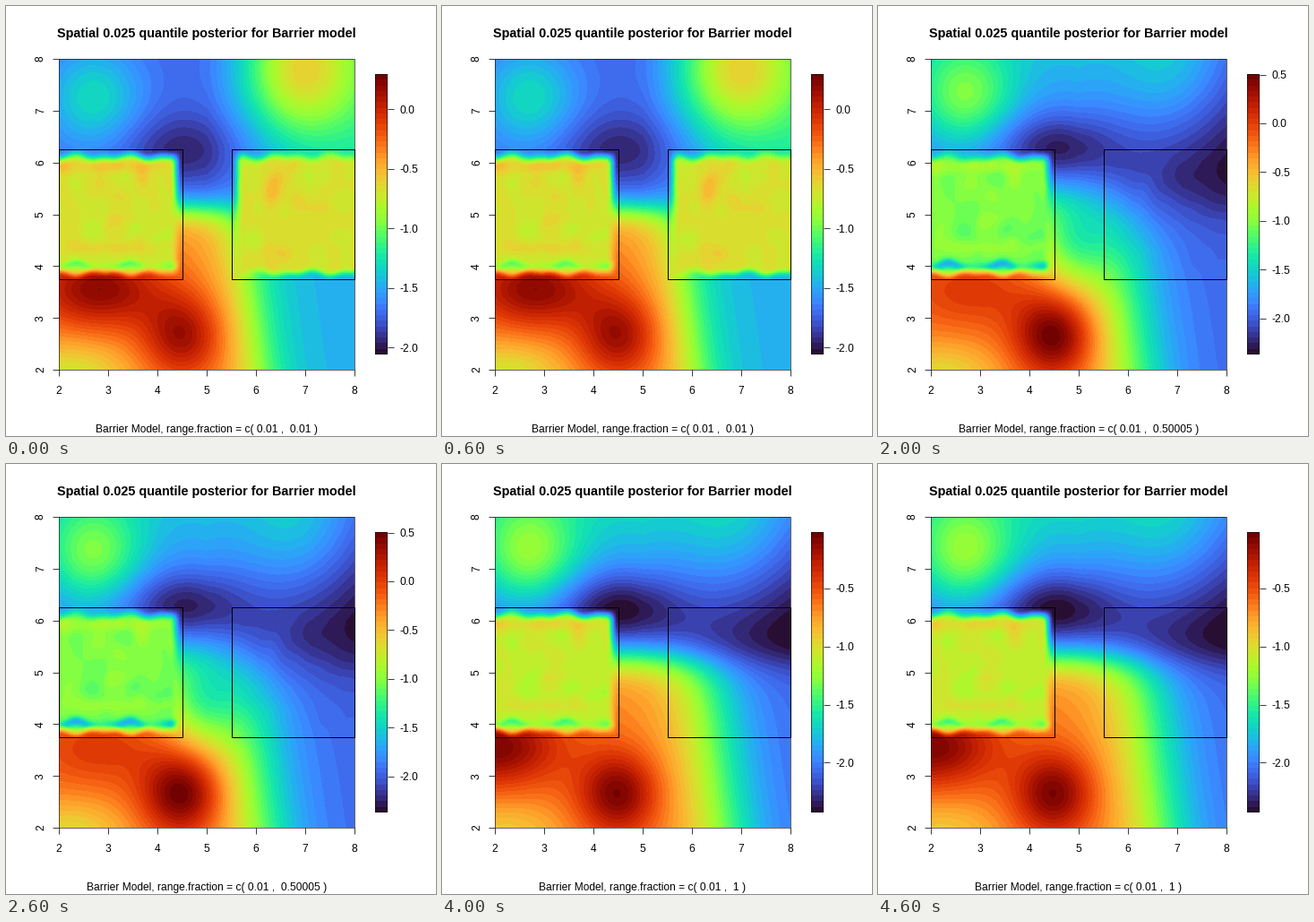
Recreate the animation shown at these times as a matplotlib script. Size 480 px wide and 480 px high, loop 5 s.

```python
import numpy as np
import matplotlib as mpl
import matplotlib.pyplot as plt
from matplotlib.animation import FuncAnimation
from matplotlib.patches import Rectangle

mpl.rcParams["font.family"] = "Liberation Sans"

DPI = 100
PX = 72 / DPI
LEFT, RIGHT, TOP, BOTTOM = 59, 389, 59, 406
BAR = (412, 426, 76, 389)
LEVELS = 50
COLORS = mpl.colormaps["turbo"](np.linspace(0, 1, LEVELS))[:, :3] ** 1.1

X, Y = np.meshgrid(np.linspace(2, 8, RIGHT - LEFT),
                   np.linspace(8, 2, BOTTOM - TOP))


def hill(x, y, rx, ry):
    return np.exp(-((X - x) / rx) ** 2 - ((Y - y) / ry) ** 2)


def sigmoid(t):
    return 1 / (1 + np.exp(-t))


def ramp(d, width):
    t = np.clip(d / width, 0, 1)
    return t * t * (3 - 2 * t)


def mottle(seed, x0, x1, count=60):
    """Random soft spots inside a barrier."""
    rng = np.random.default_rng(seed)
    return sum(rng.uniform(-1, 1)
               * hill(rng.uniform(x0, x1), rng.uniform(3.9, 6.1),
                      *rng.uniform(0.1, 0.28, 2))
               for _ in range(count))


WAVE = 0.03 * np.sin(6 * X) + 0.02 * np.sin(11 * X + 1)
INSIDE_Y = ramp(6.25 - Y + WAVE, 0.28) * ramp(Y - 3.75 + WAVE, 0.24)
LEFT_MASK = INSIDE_Y * ramp(4.5 - X, 0.26)
RIGHT_MASK = INSIDE_Y * ramp(X - 5.5, 0.26)
LEFT_NOISE = mottle(4, 2, 4.4)
RIGHT_NOISE = mottle(9, 5.6, 8)

# Warm and cold strips along the inner edges of the left barrier
GLOW = hill(3, 5.93, 1.2, 0.12) + 0.6 * hill(3, 4.35, 0.8, 0.12)
DIP = (0.65 + 0.35 * np.sin(6 * X)) * np.exp(-((Y - 4 - WAVE) / 0.09) ** 2)


def north(base, west, east, hole, lift, slope):
    return (base + lift * (Y - 7) + slope * np.maximum(X - 5, 0)
            + west * hill(2.7, 7.25, 1, 1) + east * hill(6.9, 7.8, 1.2, 1.3)
            - hole * hill(4.5, 6.25, 1.2, 0.7))


def south(cold, warm, edge, soft, hot, core, corner, pocket=0, hot_x=2.8):
    front = edge + 0.15 * (3.7 - Y)
    return (cold + warm * sigmoid((front - X) / soft)
            + hot * hill(hot_x, 3.55, 1.3, 0.75)
            + core * hill(4.5, 2.65, 0.8, 0.8)
            - corner * hill(2.2, 1.8, 1.2, 0.7)
            - pocket * hill(4.9, 4.5, 0.8, 0.9))


def scene(fraction, lo, hi, top, bottom, middle, blend,
          base, dip, right=None, grain=0):
    field = top + (bottom - top) * sigmoid((middle - Y) / blend)
    block = base + 0.035 * LEFT_NOISE + 0.06 * GLOW - dip * DIP
    if right is not None:
        field += (right + 0.03 * RIGHT_NOISE - field) * RIGHT_MASK
    field += grain * RIGHT_NOISE * RIGHT_MASK
    field += (block - field) * LEFT_MASK
    index = np.clip(field * LEVELS, 0, LEVELS - 1).astype(int)
    return fraction, lo, hi, COLORS[index]


SCENES = [
    scene("0.01", -2.06, 0.297,
          north(0.14, west=0.18, east=0.36, hole=0.1, lift=0, slope=0.06),
          south(0.25, 0.47, 5.85, 0.35, hot=0.24, core=0.22, corner=0.16),
          5.1, 0.17, base=0.575, dip=0.14, right=0.585),
    scene("0.250075", -2.097, 0.334,
          north(0.2, west=0.18, east=0.13, hole=0.16, lift=0.08, slope=-0.02),
          south(0.15, 0.55, 5.9, 0.45, hot=0.27, core=0.18, corner=0.18),
          5.1, 0.2, base=0.5, dip=0.25, grain=0.02),
    scene("0.50005", -2.372, 0.505,
          north(0.2, west=0.25, east=0.12, hole=0.16, lift=0.06, slope=-0.05),
          south(0.14, 0.6, 5.9, 0.5, hot=0.1, core=0.28, corner=0.15,
                pocket=0.25),
          5.3, 0.33, base=0.46, dip=0.22, grain=0.006),
    scene("0.750025", -2.403, -0.36,
          north(0.15, west=0.1, east=0.04, hole=0.12, lift=0.02, slope=-0.045),
          south(0.12, 0.68, 6.25, 0.55, hot=0.17, core=0.08, corner=0.07,
                pocket=0.17),
          5.1, 0.38, base=0.53, dip=0.2),
    scene("1", -2.427, -0.019,
          north(0.22, west=0.25, east=0.1, hole=0.17, lift=0.08, slope=-0.05),
          south(0.14, 0.6, 6.45, 0.5, hot=0.24, core=0.25, corner=0.12,
                hot_x=2),
          5.3, 0.22, base=0.55, dip=0.14),
]

fig = plt.figure(figsize=(480 / DPI, 480 / DPI), dpi=DPI, facecolor="white")
ax = fig.add_axes([0, 0, 1, 1])


def line(xs, ys):
    ax.plot(xs, ys, color="black", lw=0.75 * PX, solid_capstyle="butt")


def box(x0, x1, y0, y1, lw=0.75):
    ax.add_patch(Rectangle((x0, y0), x1 - x0, y1 - y0, fill=False,
                           ec="black", lw=lw * PX))


def label(x, y, text, size=12, **kw):
    kw = {"ha": "center", "va": "baseline", **kw}
    ax.text(x, y, text, fontsize=size * PX, rotation_mode="anchor", **kw)


def image(pixels, x0, x1, y0, y1):
    ax.imshow(pixels, extent=(x0, x1, y1, y0), aspect="auto",
              interpolation="nearest")


def px(x):
    return LEFT + (x - 2) * (RIGHT - LEFT) / 6


def py(y):
    return BOTTOM - (y - 2) * (BOTTOM - TOP) / 6


def draw_map(pixels):
    image(pixels, LEFT, RIGHT, TOP, BOTTOM)
    box(LEFT, RIGHT, TOP, BOTTOM, 0.6)
    for x0, x1 in ((2, 4.5), (5.5, 8)):
        box(px(x0), px(x1), py(6.25), py(3.75), 1)
    for v in range(2, 9):
        line([px(v)] * 2, [BOTTOM, BOTTOM + 7])
        label(px(v), 433, str(v))
        line([LEFT - 7, LEFT], [py(v)] * 2)
        label(42, py(v), str(v), rotation=90)


def draw_bar(lo, hi):
    x0, x1, y0, y1 = BAR
    image(COLORS[::-1, None], *BAR)
    box(x0, x1 - 1, y0, y1 - 1, 0.6)
    for v in np.arange(-2, 1, 0.5):
        if lo <= v <= hi:
            y = y1 - (v - lo) / (hi - lo) * (y1 - y0)
            line([x1, x1 + 7], [y, y])
            label(439, y + 4.5, f"{v:.1f}", ha="left")


def draw(i):
    fraction, lo, hi, pixels = SCENES[i]
    ax.clear()
    ax.set_axis_off()
    draw_map(pixels)
    draw_bar(lo, hi)
    label(224, 35, "Spatial 0.025 quantile posterior for Barrier model",
          14.4, weight="bold")
    label(224, 476, f"Barrier Model, range.fraction = c( 0.01 ,  {fraction} )")
    ax.set(xlim=(0, 480), ylim=(480, 0))
    return []


anim = FuncAnimation(fig, draw, frames=len(SCENES), interval=1000,
                     repeat=True, repeat_delay=0, init_func=lambda: [])
plt.show()
```
